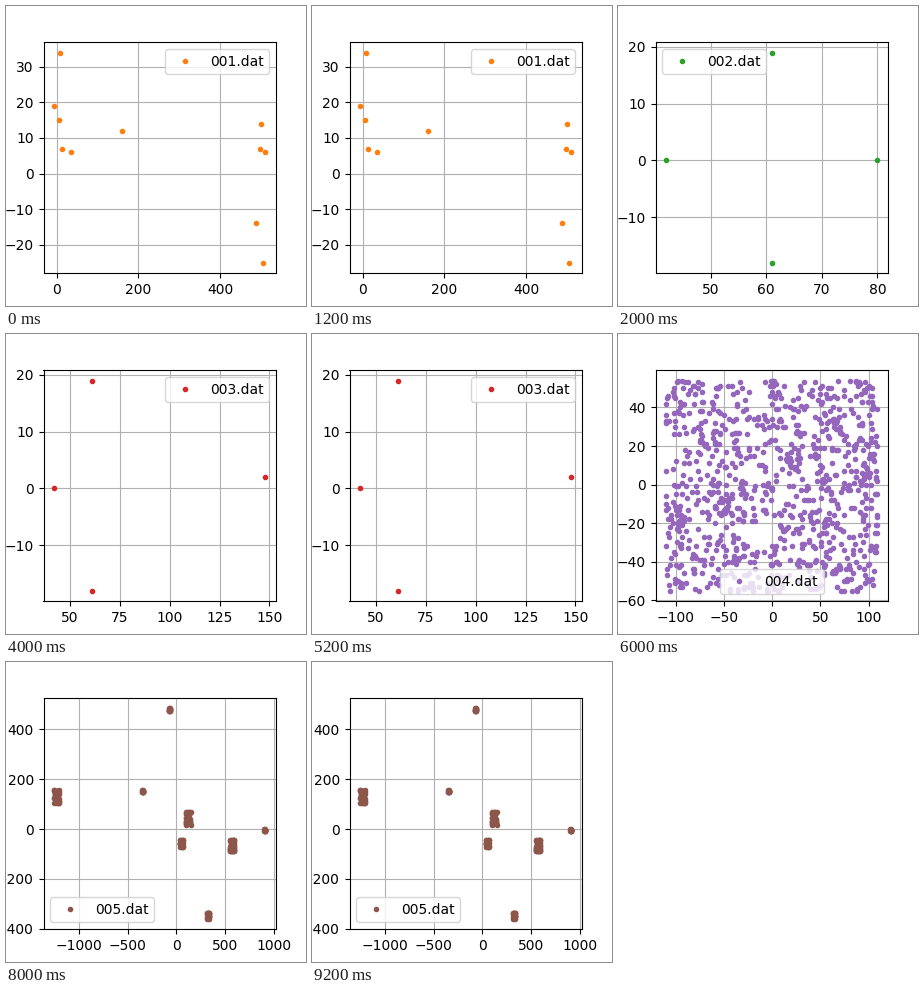
A matplotlib script for the animation above (10000 ms loop, 300x300 px).

```python
import numpy as np
import matplotlib.pyplot as plt
from matplotlib.animation import FuncAnimation

STEP_MS = 2000


def pulses():
    """A few points near the start, one in between, a few near the end."""
    start = [(-6, 19), (5, 15), (8, 34), (13, 7), (35, 6)]
    end = [(489, -14), (498, 7), (501, 14), (506, -25), (511, 6)]
    return start + [(160, 12)] + end


def cross(right, cx=61, r=19):
    """Left, top and bottom tips of a cross plus a free right tip."""
    return [(cx - r, 0), (cx, r), (cx, 1 - r), right]


def cloud(n=900):
    """Even scatter on an integer grid with one thin spot."""
    rng = np.random.default_rng(4)
    x = rng.integers(-110, 109, n, endpoint=True)
    y = rng.integers(-55, 54, n, endpoint=True)
    x[:2], y[2:4] = (-110, 109), (-55, 54)
    keep = ((x + 14) / 11) ** 2 + ((y + 27) / 8) ** 2 > 1
    return np.column_stack([x, y])[keep]


def blob(rng, x, y, r):
    """Square patch of half-width r, denser the larger it is."""
    inner = rng.uniform(-r, r, (2 * r, 2))
    corners = [(-r, -r), (r, r), (-r, r), (r, -r)]
    return np.vstack([inner, corners]) + (x, y)


def clusters():
    rng = np.random.default_rng(5)
    spots = [(-1232, 130, 26), (-347, 151, 4), (-71, 479, 5), (120, 43, 26),
             (50, -57, 14), (572, -67, 23), (909, -4, 5), (326, -347, 12)]
    return np.vstack([blob(rng, *s) for s in spots])


SETS = [
    (pulses(), "upper right"),
    (cross((80, 0)), "upper left"),
    (cross((148, 2)), "upper right"),
    (cloud(), "lower center"),
    (clusters(), "lower left"),
]

fig, ax = plt.subplots(figsize=(3, 3), dpi=100)


def draw(i):
    points, loc = SETS[i]
    x, y = np.transpose(points)
    ax.clear()
    ax.plot(x, y, ".", color=f"C{i + 1}", label=f"{i + 1:03d}.dat")
    ax.grid(True)
    ax.legend(loc=loc)


anim = FuncAnimation(fig, draw, frames=len(SETS), init_func=lambda: draw(0),
                     interval=STEP_MS, repeat=True, repeat_delay=0)
plt.show()
```
